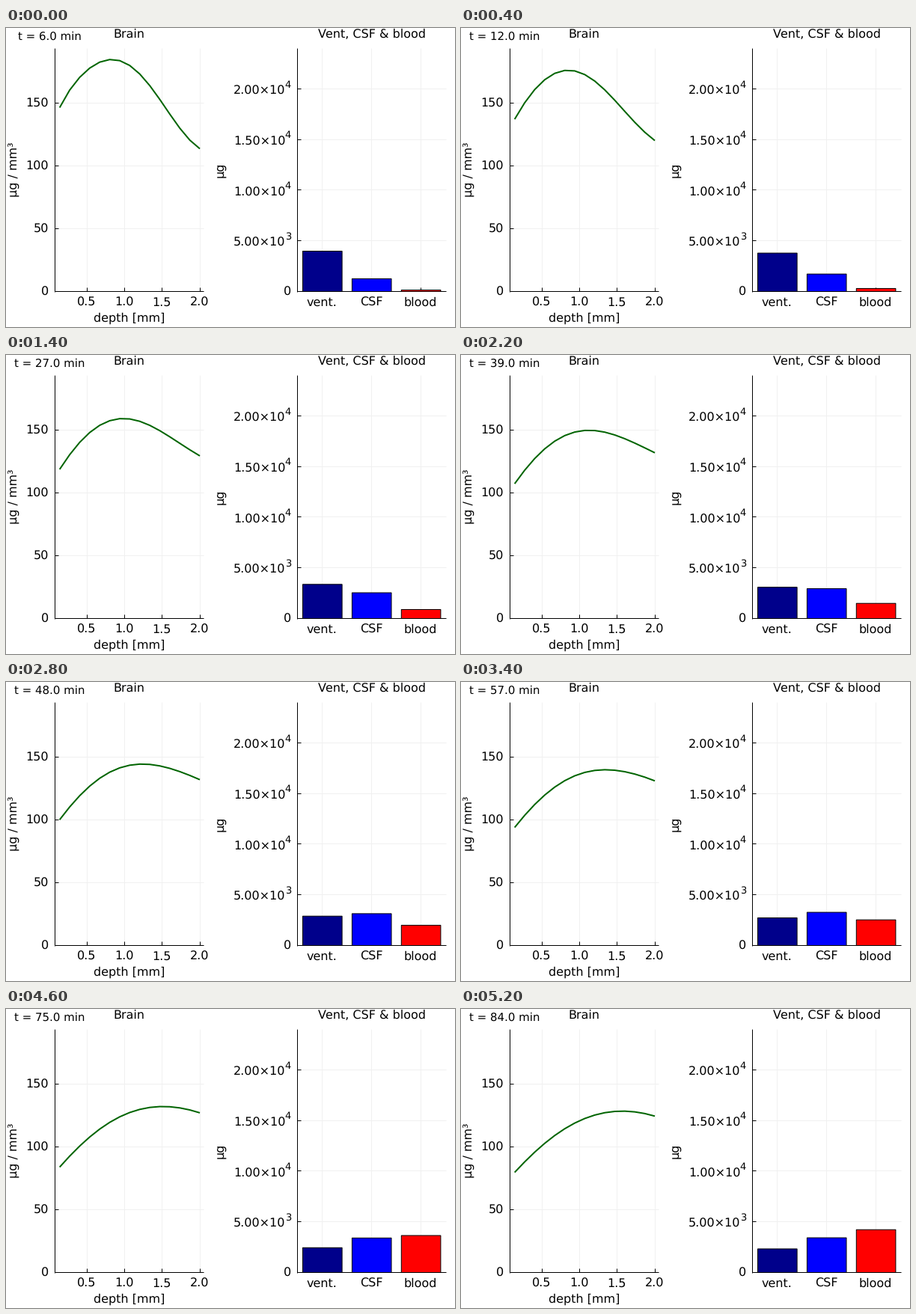
Write a matplotlib script that moves like this. It is 600 by 400 pixels and loops after 5.4 s.

```python
import numpy as np
import matplotlib.pyplot as plt
from matplotlib.animation import FuncAnimation
from matplotlib.patches import Rectangle

plt.rcParams.update({
    "toolbar": "None",
    "font.family": "DejaVu Sans",
    "text.hinting": "none",
    "text.hinting_factor": 1,
})

W, H, DPI = 600, 400, 100
PX = 72 / DPI  # one pixel in points
FRAMES, STEP = 27, 200
T0, DT = 6, 3  # minutes
TOP, BASE = 27, 352.5

fig = plt.figure(figsize=(W / DPI, H / DPI), dpi=DPI, facecolor="white")
ax = fig.add_axes([0, 0, 1, 1])
ax.set_xlim(0, W)
ax.set_ylim(H, 0)
ax.axis("off")


def rule(x0, y0, x1, y1, color="black", z=2):
    # half a pixel back, since snapping rounds up
    ax.plot([x0 - 0.5, x1 - 0.5], [y0 - 0.5, y1 - 0.5], color=color, lw=PX,
            zorder=z, solid_capstyle="butt")


def label(x, y, s, size=16.3, ha="center", rot=0):
    # text is rasterised about one pixel right of and below its anchor
    return ax.text(x - 0.8, y - 1, s, fontsize=size * PX, ha=ha,
                   va="baseline", rotation=rot, rotation_mode="anchor",
                   zorder=5)


def panel(left, right, xticks, yticks):
    for x in xticks:
        rule(x, TOP, x, BASE, "#f0f0f0", 1)
        rule(x, BASE, x, BASE - 5)
    for y in yticks:
        rule(left, y, right, y, "#f0f0f0", 1)
        rule(left, y, left + 5, y)
    rule(left, TOP, left, BASE + 0.5)
    rule(left, BASE, right, BASE)


def depth_px(d):
    return 58.3 + 100.35 * d


# Brain profile: concentration over depth
depths = np.arange(1, 5) / 2
conc = np.arange(0, 200, 50)
conc_y = BASE - 1.68 * conc
panel(65.5, 264.5, depth_px(depths), conc_y)
for d in depths:
    label(depth_px(d), 372.5, f"{d:.1f}")
for y, c in zip(conc_y, conc):
    label(58, y + 6, f"{c}", ha="right")
label(165, 14, "Brain")
label(165.3, 393.5, "depth [mm]")
label(16.8, 190.5, "µg / mm³", rot=90)

# Compartments: total mass
bar_x = 422.8 + 65.9 * np.arange(3)
mass = np.arange(5000, 25000, 5000)
mass_y = BASE - 67.8 * mass / 5000
panel(389.5, 588.5, bar_x, [BASE, *mass_y])
for x, s in zip(bar_x, ["vent.", "CSF", "blood"]):
    label(x, 372.5, s)
label(382, BASE + 6, "0", ha="right")
for y, m in zip(mass_y, mass):
    p = int(np.log10(m))
    label(374, y + 8.5, f"{m / 10 ** p:.2f}×10", ha="right")
    label(373.5, y - 0.7, f"{p}", size=13, ha="left")
label(489.5, 14, "Vent, CSF & blood")
label(292.2, 190.5, "µg", rot=90)


# The model works in pixels of height above the base line
def vent(t):
    return 18 + 38.8 * np.exp(-t / 80)


def csf(t):
    return 59.5 - 0.1085 * t - 50.1 * np.exp(-t / 33)


def blood(t):
    return 0.8 + 0.9 * (t - 22 * (1 - np.exp(-t / 25)))


def diffuse(c, t, dt=0.1, rate=0.51, drift=0.02):
    """Spread with slight drift; leak into the ventricle and the CSF."""
    inner = c[0] * (1 - 0.1115)
    outer = c[-1] - 0.062 * (c[-1] - 2.9 * csf(t))
    ext = np.concatenate([[inner], c, [outer]])
    lo, hi = ext[:-2], ext[2:]
    return c + dt * (rate * (lo - 2 * c + hi) - drift * (hi - lo) / 2)


cells = np.arange(15)
start = np.polyfit([0, 2, 5, 8, 10, 12, 14],
                   [246, 286.5, 310.3, 291, 257, 218.5, 191], 6)
profiles = [np.polyval(start, cells)]
for k in range(FRAMES - 1):
    c = profiles[-1]
    for j in range(30):
        c = diffuse(c, T0 + DT * (k + j / 30))
    profiles.append(c)

curve, = ax.plot(depth_px(2 * (cells + 1) / 15), cells, color="darkgreen",
                 lw=2 * PX, zorder=3, solid_capstyle="butt",
                 solid_joinstyle="round")
bars = [
    ax.add_patch(Rectangle((x - 26.3, BASE), 52.6, 0, fc=c, ec="black",
                           lw=PX, zorder=4, snap=False, joinstyle="miter"))
    for x, c in zip(bar_x, ["darkblue", "blue", "red"])
]
clock = label(59.2, 16.6, "", size=15)


def update(k):
    t = T0 + DT * k
    curve.set_ydata(BASE - profiles[k])
    for bar, amount in zip(bars, [vent, csf, blood]):
        bar.set_height(-amount(t))
    clock.set_text(f"t = {t:.1f} min")
    return [curve, clock, *bars]


anim = FuncAnimation(fig, update, frames=FRAMES, interval=STEP,
                     repeat=True, repeat_delay=0, blit=False)
plt.show()
```
